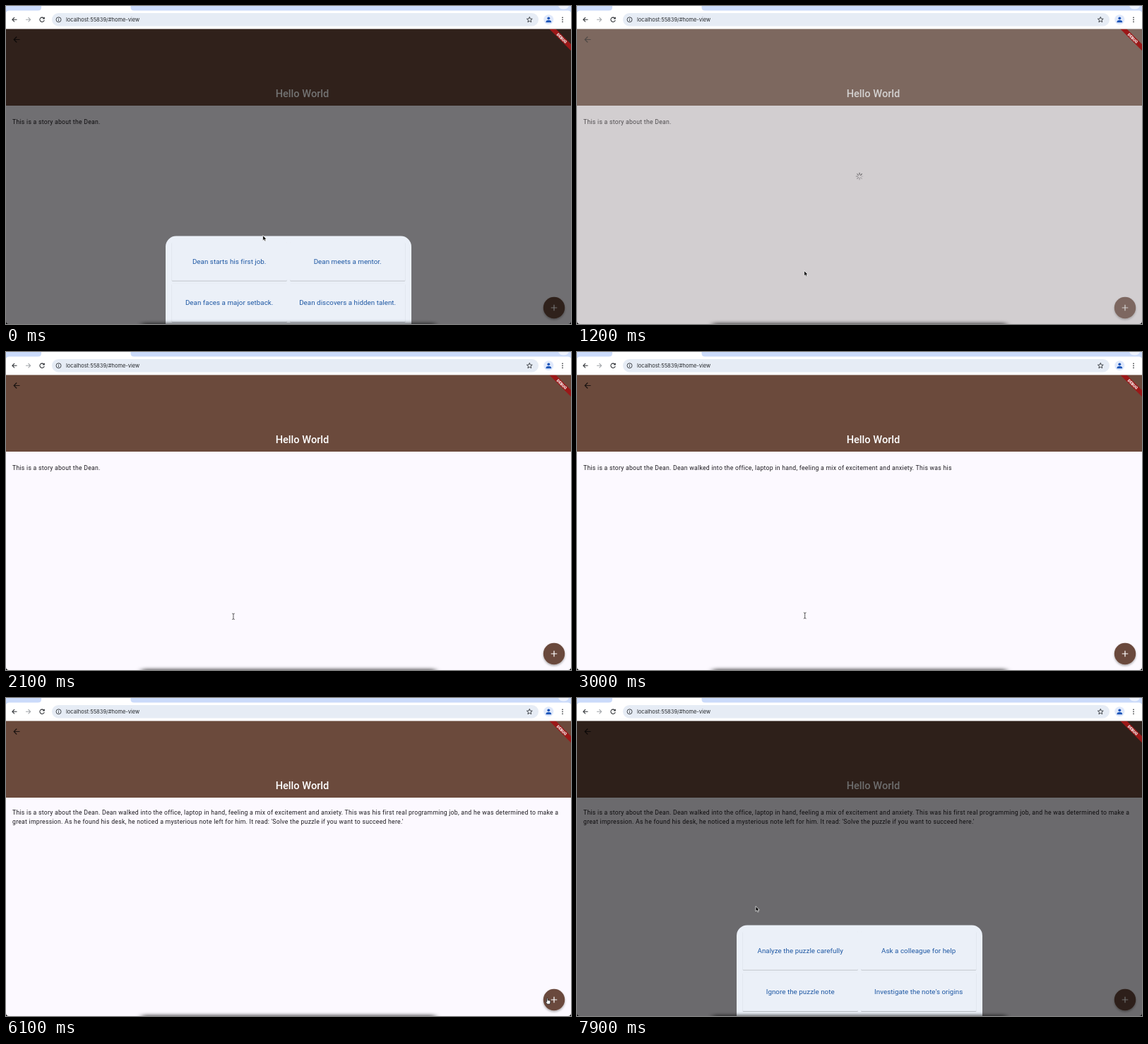
These frames come from a looping animation (800x450 px, 8 s). An HTML page:

```html
<!DOCTYPE html>
<html lang="en">
<head>
<meta charset="utf-8">
<title>Story builder</title>
<style>
  html, body { margin: 0; width: 100%; height: 100%; overflow: hidden; background: #fcf9ff; }
  svg { display: block; width: 100vw; height: 100vh; }
  text { font-family: Roboto, sans-serif; white-space: pre; user-select: none; }
  .story { font-size: 8.67px; letter-spacing: .27px; fill: #1d1b20; }
  .choice { font-size: 9.75px; letter-spacing: .054px; fill: #1d57a3; text-anchor: middle; }
  .line { fill: none; stroke-width: 1.2; }
</style>
</head>
<body>
<svg viewBox="0 0 800 450" preserveAspectRatio="none">
  <defs>
    <filter id="soft" x="-30%" y="-30%" width="160%" height="170%">
      <feDropShadow dx="0" dy="1.6" stdDeviation="1.6" flood-opacity=".35"/>
    </filter>
    <filter id="edge" x="-5%" y="-5%" width="110%" height="115%">
      <feDropShadow dx="0" dy=".7" stdDeviation=".5" flood-opacity=".32"/>
    </filter>
    <filter id="blur" x="-10%" y="-900%" width="120%" height="1900%">
      <feGaussianBlur stdDeviation="4 2.6"/>
    </filter>
    <clipPath id="page"><rect y="32.5" width="800" height="417.5"/></clipPath>
  </defs>

  <!-- app page -->
  <rect width="800" height="450" fill="#fcf9ff"/>
  <rect y="32" width="800" height="109" fill="#6b4a3c"/>
  <path class="line" d="M19.5 47.5H11.5M15.2 43.5L11.2 47.5L15.2 51.5" stroke="#1d1512"/>
  <text x="419.5" y="128.8" text-anchor="middle" font-size="14.6" font-weight="500" fill="#fff">Hello World</text>
  <text class="story" id="line1" x="9"/>
  <text class="story" id="line2" x="9" y="177.8"/>
  <g id="fab">
    <circle cx="776" cy="427" r="15.2" fill="#6b4a3c" filter="url(#soft)"/>
    <path class="line" d="M771.7 427H780.3M776 422.7V431.3" stroke="#fff"/>
  </g>

  <!-- loading layer -->
  <g id="loading">
    <rect y="32" width="800" height="418" fill="rgb(150,145,143)" fill-opacity=".42"/>
    <g id="spinner" transform="translate(400 241)" stroke="#4b494d" stroke-width="1.1" stroke-linecap="round"/>
  </g>
  <circle id="busyFab" cx="776" cy="427" r="15.2" fill="#fcfbfd" filter="url(#soft)"/>

  <!-- choices -->
  <rect id="scrim" y="32" width="800" height="418"/>
  <g id="sheet">
    <rect x="226" y="320.5" width="348" height="170" rx="15" fill="#ebf0f8"/>
  </g>

  <g clip-path="url(#page)">
    <g transform="translate(800 32.5) rotate(45)">
      <rect x="-30" y="15.2" width="60" height="6.5" fill="#9b1818"/>
      <text y="20.4" text-anchor="middle" font-size="5.5" font-weight="900" fill="#fff">DEBUG</text>
    </g>
  </g>

  <!-- browser bar -->
  <rect width="800" height="32.5" fill="#fff"/>
  <path d="M0 0H50V2Q50 6.5 45 6.5H4Q1 6.5 0 9Z" fill="#cbdbfa"/>
  <path d="M176.500 0H800V9Q799 6.500 796 6.500H181.500Q176.500 6.500 176.500 2Z" fill="#cbdbfa"/>
  <path d="M782 0H797Q795 4.500 789.500 4.500T782 0Z" fill="#eef3fd"/>
  <rect x="65" y="10" width="689" height="18.500" rx="9.250" fill="#e6ecf5"/>
  <g class="line" stroke="#33363a" style="stroke-width:1.1">
    <path d="M15.500 19.300H9M12 16.200L8.900 19.300L12 22.400"/>
    <path d="M28 19.300H34.500M31.500 16.200L34.600 19.300L31.500 22.400" stroke="#a3a6aa"/>
    <path d="M53.600 17.300A3.200 3.200 0 1 0 54.200 20M54.300 15.700V18H52"/>
    <circle cx="74.500" cy="19.300" r="3.500" style="stroke-width:.9"/>
    <path d="M74.500 18.800V21.300M74.500 17.100V17.900" style="stroke-width:.9"/>
    <path id="star" style="stroke-width:.9"/>
  </g>
  <text x="85" y="22.100" font-size="7.500" fill="#26292d" style="font-family:Inter,sans-serif">localhost:55839/#home-view</text>
  <circle cx="768.300" cy="19.300" r="7" fill="#e0e9fb"/>
  <circle cx="768.300" cy="17.300" r="1.900" fill="#1a54b8"/>
  <path d="M764.500 23.300V22Q765 20 768.300 20T772.100 22V23.300Z" fill="#1a54b8"/>
  <g fill="#33363a">
    <circle cx="788" cy="16.300" r=".85"/><circle cx="788" cy="19.300" r=".85"/><circle cx="788" cy="22.300" r=".85"/>
  </g>

  <!-- screen edge -->
  <rect x="192" y="449" width="416" height="5" rx="2.500" fill-opacity=".75" filter="url(#blur)"/>
  <path d="M0 446Q0 450 4 450H0ZM800 446Q800 450 796 450H800Z"/>

  <g id="pointer" stroke-linejoin="round">
    <path id="arrow" d="M0 0V7.200L1.700 5.700L2.900 8.300L4.200 7.700L3.100 5.200H5.300Z" stroke="#fff" stroke-width=".7"/>
    <path id="beam" d="M-1.800 -4.200Q0 -4.200 0 -3V3Q0 4.200 -1.800 4.200M1.800 -4.200Q0 -4.200 0 -3M0 3Q0 4.200 1.800 4.200" fill="none" stroke="#333" stroke-width=".8"/>
    <path id="hand" d="M-.8 .3Q0 -.6 .7 .3V2.800Q1.500 2.200 2.100 3Q2.900 2.500 3.400 3.300Q4.400 3.100 4.400 4.200V6Q4 7.200 3.600 8.200H-.2L-2.600 4.900Q-2.500 3.800 -.8 5Z" fill="#fff" stroke="#111" stroke-width=".75"/>
  </g>
</svg>

<script>
const $ = id => document.getElementById(id);
const clamp = v => Math.max(0, Math.min(1, v));
const ramp = (t, from, length) => clamp((t - from) / length);
const show = (id, on) => $(id).style.display = on ? '' : 'none';

function make(parent, tag, attrs) {
  const node = document.createElementNS('http://www.w3.org/2000/svg', tag);
  for (const key in attrs) node.setAttribute(key, attrs[key]);
  return parent.appendChild(node);
}

const LOOP = 8000, BASE_WORDS = 7, FIRST_LINE = 36;
const words = ("This is a story about the Dean. Dean walked into the office, laptop in hand, " +
  "feeling a mix of excitement and anxiety. This was his first real programming job, and he was " +
  "determined to make a great impression. As he found his desk, he noticed a mysterious note left " +
  "for him. It read: 'Solve the puzzle if you want to succeed here.'").split(' ');
const choices = [
  ['Dean starts his first job.', 'Dean meets a mentor.',
   'Dean faces a major setback.', 'Dean discovers a hidden talent.'],
  ['Analyze the puzzle carefully', 'Ask a colleague for help',
   'Ignore the puzzle note', "Investigate the note's origins"]
];
// time, value(s)
const typing = [[2050, 0], [3000, 18.3], [4500, 34.3], [5350, 55]];
const path = [
  [0, 363.7, 324.7], [600, 432, 375.5], [720, 432, 375.5], [960, 321.7, 374.7], [1900, 321.7, 374.7],
  [2500, 322.7, 373], [3650, 322.7, 373], [4550, 480, 352], [5400, 675, 358], [5950, 766.5, 425],
  [6450, 766.5, 425], [7150, 770.7, 311.7], [7350, 770.7, 311.7], [7880, 253, 294.7]
];

const cards = [0, 1, 2, 3].map(i => {
  const x = 234.5 + i % 2 * 167.5, y = 329 + (i >> 1) * 58.6;
  return {
    x, y,
    box: make($('sheet'), 'rect', { x, y, width: 163.5, height: 54.5, rx: 1.5, filter: 'url(#edge)' }),
    label: make($('sheet'), 'text', { class: 'choice', x: x + 81.7, y: y + 30.6 })
  };
});
const ticks = [...Array(8).keys()].map(i =>
  make($('spinner'), 'path', { d: 'M0 -2.300V-4.700', transform: `rotate(${i * 45})` }));
$('star').setAttribute('d', 'M' + [...Array(10).keys()].map(i => {
  const r = i % 2 ? 1.8 : 4.1, a = i * Math.PI / 5;
  return `${741.3 + r * Math.sin(a)} ${19.5 - r * Math.cos(a)}`;
}).join('L') + 'Z');

function sample(keys, t, ease = p => p) {
  if (t <= keys[0][0]) return keys[0].slice(1);
  const i = keys.findIndex(k => k[0] > t);
  if (i < 0) return keys[keys.length - 1].slice(1);
  const a = keys[i - 1], b = keys[i], p = ease((t - a[0]) / (b[0] - a[0]));
  return a.slice(1).map((v, n) => v + (b[n + 1] - v) * p);
}

function sheetOpen(t) {
  if (t < 1000) return 1 - (1 - ramp(t, -200, 250)) ** 2;
  if (t < 4000) return (1 - ramp(t, 1000, 200)) ** 2;
  return 1 - (1 - ramp(t, 7672, 250)) ** 2;
}

function draw(t) {
  const open = sheetOpen(t), drop = (1 - open) * 130;
  const late = t > 4000;
  const busy = late ? ramp(t, 6480, 120) * (1 - ramp(t, 7620, 80))
                    : ramp(t, 1060, 120) * (1 - ramp(t, 1930, 100));
  const [x, y] = sample(path, t, p => p * p * (3 - 2 * p));

  const count = BASE_WORDS + Math.floor(sample(typing, t)[0]);
  $('line1').textContent = words.slice(0, Math.min(count, FIRST_LINE)).join(' ');
  $('line1').setAttribute('y', count > FIRST_LINE ? 164.8 : 166.8);
  $('line2').textContent = words.slice(FIRST_LINE, Math.max(count, FIRST_LINE)).join(' ');

  $('loading').setAttribute('opacity', busy);
  const step = Math.floor(t / 125) % 8;
  ticks.forEach((tick, i) => tick.setAttribute('opacity', .85 - (step - i + 8) % 8 * .09));
  show('busyFab', late && busy > 0);

  $('scrim').setAttribute('fill-opacity', .575 * open);
  show('sheet', open > 0);
  $('sheet').setAttribute('transform', `translate(0 ${drop})`);
  let over = false;
  cards.forEach((card, i) => {
    const top = card.y + drop;
    const hit = open > 0 && x > card.x && x < card.x + 163.5 && y > top && y < top + 54.5;
    over = over || hit;
    card.box.setAttribute('fill', hit ? '#cfddec' : '#ebf0f8');
    card.label.textContent = choices[+late][i];
  });

  const onFab = Math.hypot(x - 776, y - 427) < 15.2;
  const kind = over || onFab ? 'hand' : open > 0 || busy > 0 ? 'arrow' : 'beam';
  for (const id of ['arrow', 'beam', 'hand']) show(id, id === kind);
  $('pointer').setAttribute('transform', `translate(${x} ${y})`);
}

const start = performance.now();
function tick() {
  draw((performance.now() - start) % LOOP);
  requestAnimationFrame(tick);
}
tick();
</script>
</body>
</html>
```
